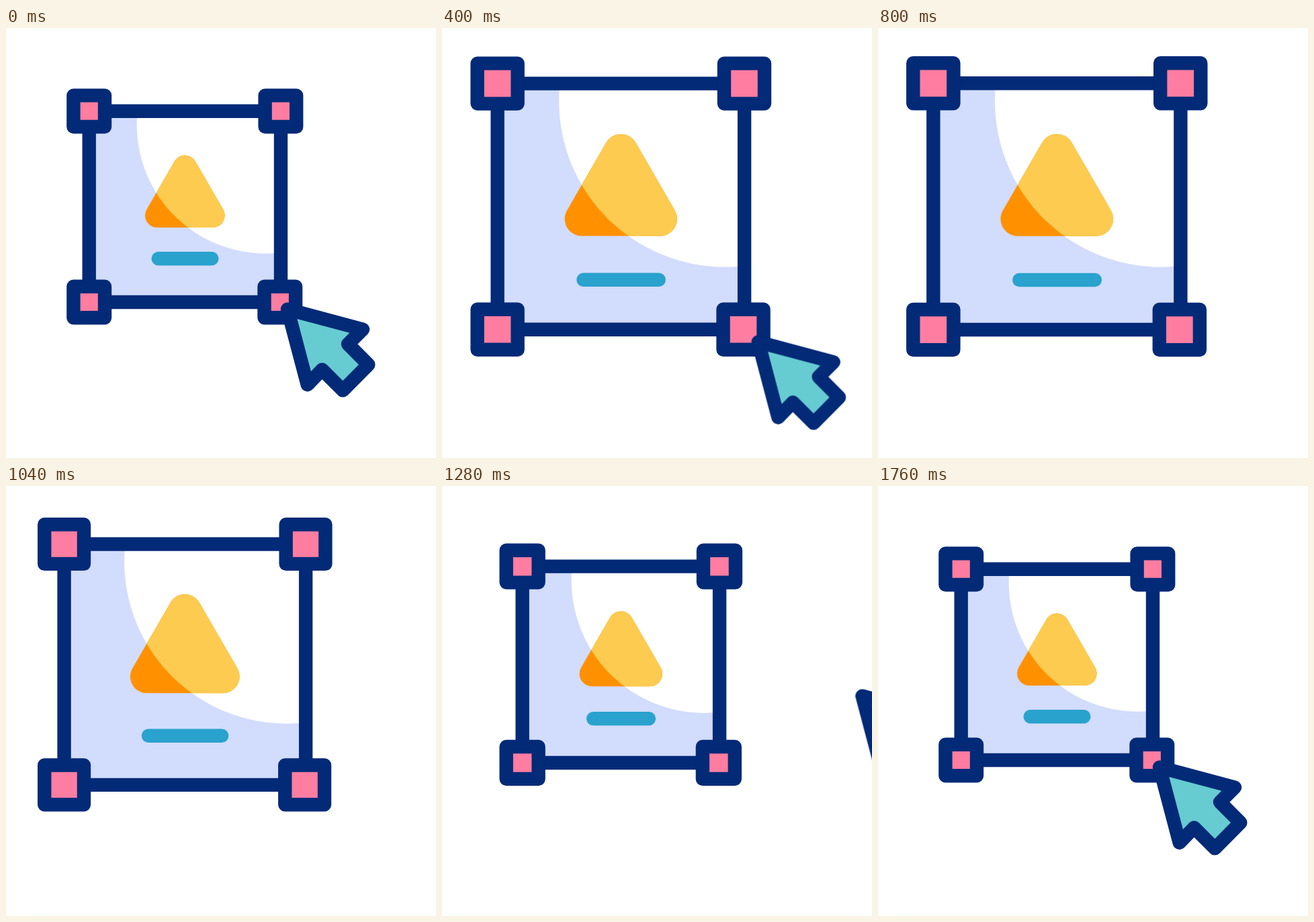
Animation of 640 by 640 pixels, one loop 2.04 s. Source, as an HTML page:

```html
<!DOCTYPE html>
<html lang="en">
<head>
<meta charset="utf-8">
<title>Resize</title>
<style>
  @property --grow {
    syntax: "<number>";
    inherits: true;
    initial-value: 0;
  }

  html, body {
    margin: 0;
    width: 100%;
    height: 100%;
    overflow: hidden;
    background: #fff;
  }

  svg {
    display: block;
    width: 100%;
    height: 100%;
    animation: grow 2040ms infinite;
  }

  .frame, .art {
    transform-origin: 266.3px 266.4px;
  }
  .frame { transform: scale(calc(1 + 0.29 * var(--grow))); }
  .art { transform: scale(calc(1 + 0.414 * var(--grow))); }

  .line {
    stroke: #032a77;
    stroke-width: 20.4;
    stroke-linejoin: round;
    stroke-linecap: round;
    vector-effect: non-scaling-stroke;
  }
  .handle { fill: #ff7da0; }
  .bar { stroke: #29a2ce; }
  .tri { stroke-width: 36; stroke-linejoin: round; }
  .dark { fill: #ff9100; stroke: #ff9100; }
  .light { fill: #fdcb50; stroke: #fdcb50; }

  .cursor {
    fill: #66ccd1;
    animation: drag 2040ms infinite;
  }

  /* enlarge 50–430 ms, shrink 945–1375 ms */
  @keyframes grow {
    0%, 2.451% { --grow: 0; animation-timing-function: cubic-bezier(.33, 0, .46, 1); }
    21.078%, 46.324% { --grow: 1; animation-timing-function: cubic-bezier(.42, 0, .58, 1); }
    67.402%, 100% { --grow: 0; }
  }

  /* follow the corner, leave at the bottom, return from the right */
  @keyframes drag {
    0%, 2.451% {
      transform: translate(0, 0);
      animation-timing-function: cubic-bezier(.33, 0, .46, 1);
    }
    21.078%, 22.157% {
      transform: translate(52px, 49px);
      animation-timing-function: cubic-bezier(.3333, 0, .6667, .3333);
    }
    41.176% {
      transform: translate(-257px, 322px);
      animation-timing-function: step-end;
    }
    60.784% {
      transform: translate(245px, -126px);
      animation-timing-function: cubic-bezier(.3333, .6667, .6667, 1);
    }
    85.294%, 100% { transform: translate(0, 0); }
  }
</style>
</head>
<body>
<svg viewBox="0 0 640 640">
  <defs>
    <clipPath id="disc">
      <circle class="frame" cx="386.3" cy="144.1" r="191.6"/>
    </clipPath>
    <path id="tri" class="tri" d="M266.3 207.5 L307.6 279 H225 Z"/>
    <rect id="handle" class="line handle" x="-23.3" y="-23.3" width="46.6" height="46.6"/>
  </defs>

  <g class="frame">
    <path fill="#d2dcfd" d="M123.7 123.7 H409 V408 H123.7 Z"/>
    <circle fill="#fff" cx="386.3" cy="144.1" r="191.6"/>
  </g>

  <g class="art">
    <use href="#tri" class="dark"/>
    <path class="line bar" d="M226.7 343.2 H306.3"/>
  </g>
  <g clip-path="url(#disc)">
    <g class="art"><use href="#tri" class="light"/></g>
  </g>

  <g class="frame">
    <path class="line" fill="none" d="M123.7 123.7 H409 V408 H123.7 Z"/>
    <use href="#handle" x="123.7" y="123.7"/>
    <use href="#handle" x="408.9" y="123.7"/>
    <use href="#handle" x="123.7" y="408"/>
    <use href="#handle" x="407.8" y="408"/>
  </g>

  <path class="line cursor" d="M419 418.7 L531 448.5 L509 470.5 L539.4 501 L501.4 539.4 L470.5 508.5 L448.7 531 Z"/>
</svg>
</body>
</html>
```
